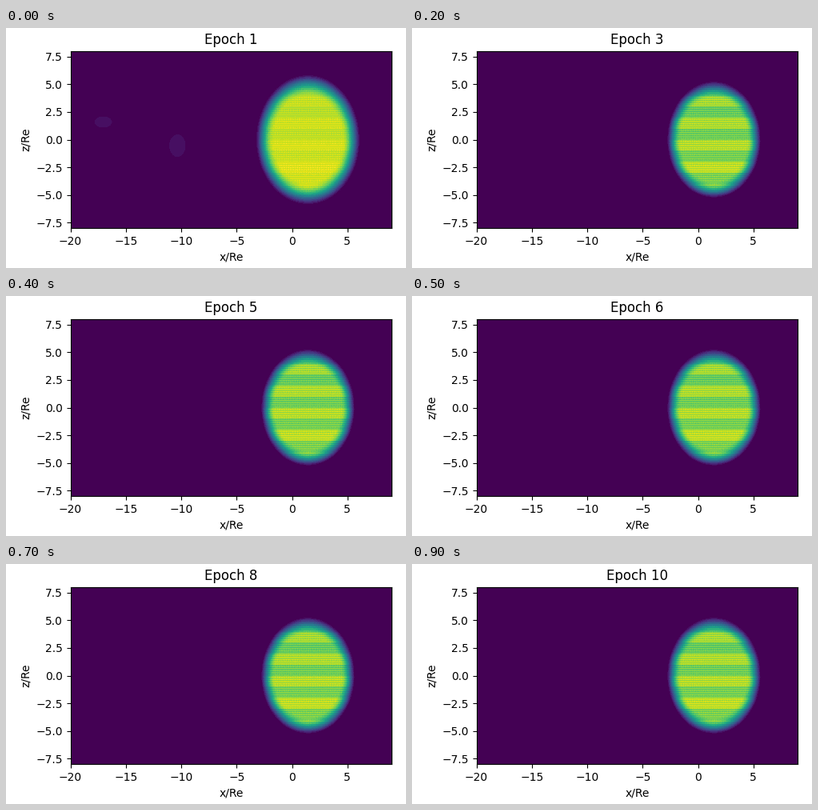
A matplotlib script for the animation above (1 s loop, 500 by 300 pixels).

```python
import numpy as np
import matplotlib.pyplot as plt
from matplotlib.animation import FuncAnimation

W, H, DPI = 500, 300, 100
LEFT, RIGHT, TOP, BOTTOM = 80.56, 482.16, 29.05, 249.95
X_RANGE, Z_RANGE = (-20, 9), (-8, 8)
FRAMES = 10
LEVELS = 25
STRIPE = 0.2

plt.rcParams["font.family"] = "DejaVu Sans"
fig = plt.figure(figsize=(W / DPI, H / DPI), dpi=DPI, facecolor="white")
ax = fig.add_axes([LEFT / W, 1 - BOTTOM / H, (RIGHT - LEFT) / W, (BOTTOM - TOP) / H])

x, z = np.meshgrid(
    np.linspace(*X_RANGE, 402),
    np.linspace(Z_RANGE[1], Z_RANGE[0], 221),
)


def radius(cx, cz, rx, rz):
    return np.hypot((x - cx) / rx, (z - cz) / rz)


def lerp(start, end, t):
    return start + (end - start) * t


def blob(cx, cz, rx, rz):
    return 0.07 * np.clip(1.7 - radius(cx, cz, rx, rz), 0, 1)


def field(frame):
    """Striped ellipse that relaxes quickly from its first shape to the settled one."""
    early = np.exp(-4 * frame)
    rx, rz = lerp(4.28, 4.75, early), lerp(5.35, 5.97, early)
    rim = lerp(0.30, 0.35, early)
    depth = np.clip((1 - radius(1.4, 0, rx, rz)) / rim, 0, 1)

    # Unit-high bands alternate between bright and dull.
    bright = np.floor(z) % 2
    mean = lerp(0.77 + 0.10 * bright, 0.89 + 0.03 * bright, early) - 0.006 * z
    ripple = lerp(0.05, 0.03, early) * np.sin(2 * np.pi * z / STRIPE)
    grain = 0.012 * np.sin(2 * np.pi * x / STRIPE)
    body = np.sin(np.pi / 2 * depth) ** 1.3 * np.clip(mean + ripple + grain, 0, 1)

    blobs = np.maximum(blob(-17.1, 1.6, 0.7, 0.45), blob(-10.4, -0.55, 0.65, 0.9))
    return np.floor(np.maximum(body, blobs * early) * LEVELS) / LEVELS


image = ax.imshow(
    field(0), cmap="viridis", vmin=0, vmax=0.96, interpolation="nearest",
    extent=(*X_RANGE, *Z_RANGE), aspect="auto",
)
ax.set_xticks(range(-20, 6, 5))
ax.set_yticks(np.arange(-7.5, 8, 2.5))
ax.set_xlabel("x/Re")
ax.set_ylabel("z/Re")
title = ax.set_title("Epoch 1", pad=6.6)


def update(frame):
    image.set_data(field(frame))
    title.set_text(f"Epoch {frame + 1}")
    return image, title


anim = FuncAnimation(
    fig, update, frames=FRAMES, interval=100, repeat=True, repeat_delay=0
)
plt.show()
```
